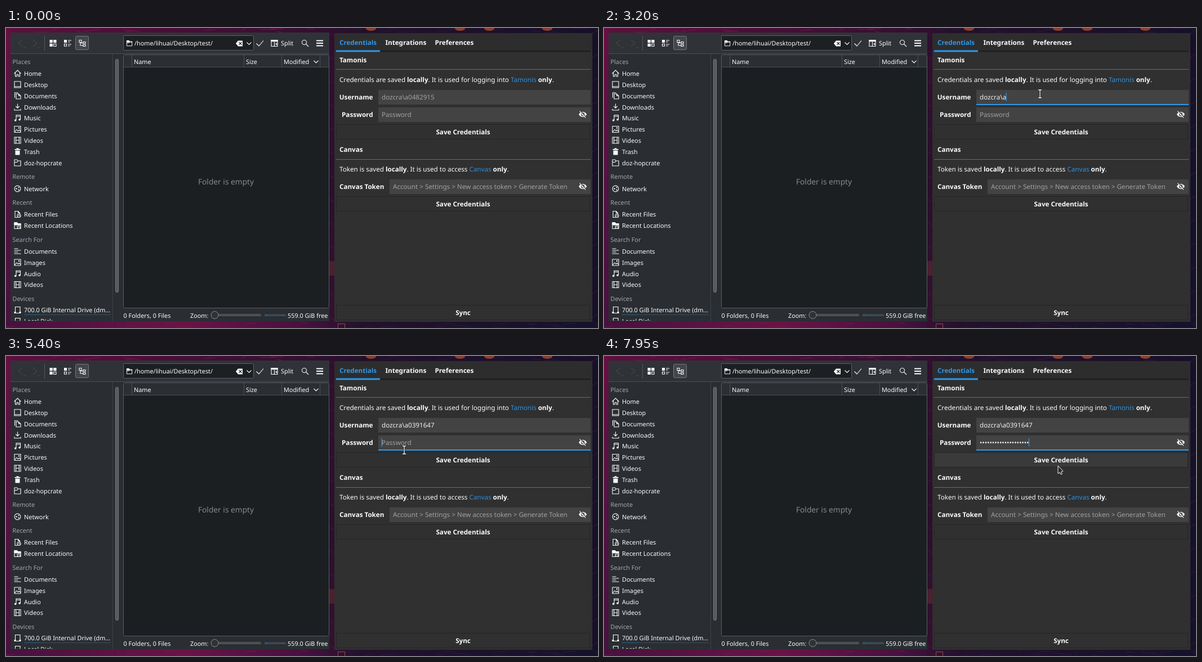
Write an HTML page that moves like this. It is 1051 px wide and 533 px high and loops after 8000 ms.

```html
<!DOCTYPE html>
<html lang="en">
<head>
<meta charset="utf-8">
<title>File sync setup</title>
<style>
  html, body { margin: 0; width: 100%; height: 100%; overflow: hidden; background: #1d1029; }
  svg { display: block; }
  text { font-family: "Noto Sans", "Open Sans", sans-serif; text-rendering: geometricPrecision; white-space: pre; }
  .b { font-weight: 700; }
  .link { fill: #2d8fdd; }
  .icon { fill: none; stroke: #fcfcfc; stroke-width: 1.1; }
  .icon .f { fill: #fcfcfc; stroke: none; }
</style>
</head>
<body>
<svg id="stage" width="1051" height="533" viewBox="0 0 1051 533"></svg>
<script>
const SMALL = 10.86, BIG = 11.63;
const WHITE = '#fcfcfc', DIM = '#a3a6a9', HINT = '#a2a2a2', BLUE = '#2f98ea';
const SAMPLE = 'dozcra\\a0482915', USER = 'dozcra\\a0391647';

const rect = (x, y, w, h, fill, more = '') =>
  `<rect x="${x}" y="${y}" width="${w}" height="${h}" fill="${fill}" ${more}/>`;
const line = (d, stroke, width = 1) =>
  `<path d="${d}" fill="none" stroke="${stroke}" stroke-width="${width}"/>`;
// text is placed by the middle of its capitals
const text = (x, mid, s, size = SMALL, fill = WHITE, more = '') =>
  `<text x="${x}" y="${mid + size * 0.36}" font-size="${size}" fill="${fill}" ${more}>${s}</text>`;
const bold = (x, mid, s, fill = WHITE, more = '') => text(x, mid, s, BIG, fill, 'class="b" ' + more);
const icon = (x, y, body) => `<g class="icon" transform="translate(${x} ${y})">${body}</g>`;
const p = d => `<path d="${d}"/>`;
const solid = d => `<path class="f" d="${d}"/>`;
const dot = (x, y, r) => `<circle class="f" cx="${x}" cy="${y}" r="${r}"/>`;

const folder = p('M.5 11.5V.5H5L6.5 2.5H11.5V11.5ZM.5 5H5L6.8 2.8');
const clock = '<circle cx="8.5" cy="8.5" r="3" fill="#2a2e32"/>' + p('M8.5 6.8V8.7H10');
const icons = {
  home: p('M0 6.5L6 .6 12 6.5M2 5V11.5H4.6V8H7.4V11.5H10V5'),
  desktop: p('M.5 .5H11.5V11.5H.5ZM.5 9.5H11.5'),
  docs: p('M3.5 2.5H8L11.5 6V11.5H3.5ZM8 2.5V6H11.5M1 9.5V.5H7'),
  down: p('M6 0V7.5M2.8 4.5L6 7.7 9.2 4.5M.5 9V11.5H11.5V9'),
  music: p('M3.5 9.5V.8H11V8.5M3.5 3H11') + dot(2.2, 10, 1.8) + dot(9.6, 8.8, 1.8),
  pics: p('M.5 .5H11.5V11.5H.5ZM1 10.5L4.5 6.5 6.8 9 8.8 7 11.5 9.8') + dot(8.5, 3.5, 1.2),
  video: p('M.5 .5H11.5V11.5H.5ZM3.2 0V12M8.8 0V12M3.2 6H8.8'),
  trash: solid('M4 0H8V1.5H11V3.2H1V1.5H4ZM2 4.2H10V12H2Z'),
  folder,
  net: '<circle cx="6" cy="6" r="5.4"/>' + dot(4, 6, 1.2) + dot(8, 3.8, 1.1) + dot(8, 8.2, 1.1),
  recent: p('M1.5 .5H7L10 3.5V6M7 .5V3.5H10M1.5 0V11.5H6') + clock,
  places: folder + solid('M0 0H5L6.5 2.5H12V5H0Z') + clock,
  lines: p('M0 1.5H7M0 4.5H12M0 7.5H7M0 10.5H12'),
  drive: p('M2 .5H10.5V11.5H2Z') + solid('M0 9H3V12H0ZM9 9H12V12H9Z')
};

const gradient = (id, stops, more = '') => `<linearGradient id="${id}" ${more}>` +
  stops.map(([at, c]) => `<stop offset="${at}" stop-color="${c}"/>`).join('') + '</linearGradient>';

function wallpaper() {
  let seed = 7;
  const rnd = () => (seed = seed * 16807 % 2147483647) / 2147483647;
  const down = 'x2="0" y2="1"';
  let s = '<defs>' +
    gradient('top', [[0, '#5f0f3d'], [0.2, '#500d3a'], [0.5, '#350f30'], [0.6, '#22102a'], [1, '#171029']]) +
    gradient('bottom', [[0, '#47113f'], [0.3, '#6c1248'], [0.5, '#481040'], [0.6, '#22112d'], [1, '#16122b']]) +
    gradient('left', [[0, '#680f42'], [0.5, '#561143'], [1, '#47113f']], down) +
    gradient('gap', [[0, '#300f2e'], [0.6, '#2a102c'], [1, '#35112f']], down) +
    '<clipPath id="side"><rect x="8" y="46" width="181" height="474"/></clipPath></defs>' +
    rect(0, 0, 1051, 266, 'url(#top)') + rect(0, 266, 1051, 267, 'url(#bottom)') +
    rect(0, 0, 8, 533, 'url(#left)') + rect(574, 0, 9, 533, 'url(#gap)') + rect(1041, 9, 10, 513, '#171029');
  for (let i = 0; i < 60; i++) {
    const x = rnd() * 1051, y = i % 2 ? rnd() * 9 : 522 + rnd() * 11;
    s += line(`M${x} ${y}l${8 + rnd() * 22} ${rnd() * 8 - 4}`, x < 580 ? '#7a1a4c' : '#2c1c40', 0.8);
  }
  for (let y = 10; y < 520; y += 42) s += line(`M1041 ${y}l10 -6M0 ${y}l8 5M574 ${y}l9 4`, '#4a1b45', 0.8);
  for (const x of [648, 806, 858, 961])
    s += `<ellipse cx="${x}" cy="1" rx="9" ry="4" fill="#8a3f2e"/>`;
  return s + rect(574, 414, 9, 26, '#4c2030') + line('M589.5 533V525.5H601.5V533', '#a04a30');
}

function sidebar() {
  const rows = [
    [81, 'home', 'Home'], [101, 'desktop', 'Desktop'], [121, 'docs', 'Documents'], [141, 'down', 'Downloads'],
    [160.5, 'music', 'Music'], [180.5, 'pics', 'Pictures'], [200, 'video', 'Videos'], [220, 'trash', 'Trash'],
    [240, 'folder', 'doz-hopcrate'], [286, 'net', 'Network'], [331.5, 'recent', 'Recent Files'],
    [351.5, 'places', 'Recent Locations'], [397, 'lines', 'Documents'], [417, 'pics', 'Images'],
    [437, 'music', 'Audio'], [456.5, 'video', 'Videos'], [501.5, 'drive', '700.0 GiB Internal Drive (dm...'],
    [521.5, 'drive', 'Local Disk']
  ];
  const heads = [[60, 'Places'], [264.5, 'Remote'], [310.5, 'Recent'], [376, 'Search For'], [481.5, 'Devices']];
  return '<g clip-path="url(#side)">' +
    rows.map(([y, k, s]) => icon(14.5, y - 6.5, icons[k]) + text(32, y, s)).join('') +
    heads.map(([y, s]) => text(11.5, y, s, SMALL, DIM)).join('') +
    rect(32, 508.5, 154, 1.6, '#35434f') + rect(32, 508.5, 28, 1.6, '#274f6c') + '</g>' +
    line('M189.5 46V521', '#3e4246') +
    rect(194.5, 55.5, 5, 414, '#54585b', 'rx="2.5" stroke="#7b7e81"');
}

function toolbar() {
  const tree = p('M.5 .5H4.5V4.5H.5ZM7.5 3.5H11.5V6.5H7.5ZM7.5 8.5H11.5V11.5H7.5ZM2.5 4.5V10H7.5M2.5 5.5H7.5');
  return rect(8, 8, 566, 38, '#2f3338') + line('M8 45.5H574', '#4b4f53') +
    line('M29 21L22 27 29 33M48 21L55 27 48 33M31 34l2 2 2-2M57 34l2 2 2-2', '#4c5054') +
    line('M68.5 14V40', '#55595d') +
    icon(77.5, 21, solid('M0 0H5.3V5.3H0ZM6.7 0H12V5.3H6.7ZM0 6.7H5.3V12H0Z') + p('M7.2 7.2H11.5V11.5H7.2Z')) +
    icon(103, 21, solid('M0 0H5V5H0Z') + p('M.5 7.2H4.5V11.2H.5ZM7 1H13M7 3.8H10.5M7 8H13M7 10.8H10.5')) +
    rect(123.5, 14.5, 23, 24, '#43474b', 'rx="2" stroke="#74787b"') + icon(129.5, 21, tree) +
    rect(208.5, 13.5, 231, 26, '#1c2023', 'rx="2" stroke="#5d6164"') +
    icon(214, 22, '<g transform="scale(.85)">' + folder + solid('M0 0H5L6.5 2.5H12V4H0Z') + '</g>') +
    text(228, 27.5, '/home/lihuai/Desktop/test/') +
    icon(408, 22.5, solid('M0 5L4 0H12V10H4Z') + '<path d="M5.5 2.5l5 5m0-5l-5 5" stroke="#1c2023"/>') +
    line('M427.5 25.5L431.5 29.5 435.5 25.5M444.5 27.5L449 32 457 22.5', WHITE, 1.1) +
    icon(470.5, 21, p('M.5 .5H11.5V11.5H.5ZM6 3.5V12M8 7.5H11M9.5 5.5V9.5') + solid('M0 0H12V3.2H0Z')) +
    text(488, 27.5, 'Split') +
    icon(525, 21, '<circle cx="4.5" cy="4.5" r="4"/>' + p('M7.5 7.5L12 12')) +
    line('M551 22.5H563M551 27H563M551 31.5H563', WHITE, 1.8);
}

function fileView() {
  return rect(208, 47, 366, 450, '#1b1f22', 'rx="2"') + rect(209, 48, 364, 22, '#2b2f34') +
    line('M209 69.5H573M223.5 48V70M422.5 48V70M489.5 48V70M557.5 48V70', '#4c5054') +
    text(227, 60, 'Name') + text(426, 60, 'Size') + text(493, 60, 'Modified') +
    line('M546.5 58L550.5 62 554.5 58', WHITE, 1.1) +
    text(390.5, 273, 'Folder is empty', 13.75, '#85898b', 'text-anchor="middle"') +
    rect(208.5, 47.5, 365, 450, 'none', 'id="viewEdge" rx="2"') +
    text(208.5, 511, '0 Folders, 0 Files') + text(327, 511, 'Zoom:') +
    rect(364.5, 508.5, 88, 3, '#45494d', 'rx="1.5" stroke="#5b5f63"') +
    '<circle cx="370.5" cy="510" r="6.5" fill="#2f3337" stroke="#8a8d90"/>' +
    rect(459, 508.5, 38, 3.5, '#3c4b57', 'rx="1.5"') + rect(459, 508.5, 5, 3.5, '#27587c', 'rx="1.5"') +
    text(500, 511, '559.0 GiB free');
}

const field = (x, y) => rect(x, y, 1038 - x, 26, '#434343');
const button = (y, s, id = '') => rect(586.5, y + 0.5, 450, 26, '#303030', `stroke="#262626" id="${id}"`) +
  bold(811.5, y + 13.5, s, WHITE, 'text-anchor="middle"');
const eye = y => icon(1017, y - 6, solid('M0 6C3 0 11 0 14 6C11 12 3 12 0 6Z') +
  '<circle cx="7" cy="6" r="3.2" fill="#434343" stroke="none"/>' + dot(7, 6, 1.8) +
  '<path d="M2.3 -.4L13 11" stroke="#434343" stroke-width="1.4"/>' + p('M1.4 .2L12 11.8'));
const note = (y, a, b, c, name) => text(592, y, `${a}<tspan class="b">locally</tspan>${b}` +
  `<tspan class="link">${name}</tspan> <tspan class="b">only</tspan>${c}`, BIG);

function settings() {
  return rect(583, 9, 458, 513, '#303030') + rect(583, 9, 458, 31, '#2d2d2d') +
    rect(586, 40, 452, 2.5, '#1f1f1f') + rect(586, 39.5, 78, 3, BLUE) +
    bold(592, 26, 'Credentials', BLUE) + bold(673.5, 26, 'Integrations') + bold(761.5, 26, 'Preferences') +
    bold(592, 57, 'Tamonis') + line('M586 73.5H1038M586 233.5H1038', '#6b6b6b') +
    note(91.5, 'Credentials are saved ', '. It is used for logging into ', '.', 'Tamonis') +
    bold(651.5, 123, 'Username', WHITE, 'text-anchor="end"') + field(661, 110) +
    bold(651.5, 154, 'Password', WHITE, 'text-anchor="end"') + field(661, 141) + eye(153.5) +
    button(171, 'Save Credentials', 'save') + bold(592, 216, 'Canvas') +
    note(251, 'Token is saved ', '. It is used to access ', '.', 'Canvas') +
    bold(592, 282, 'Canvas Token') + field(681, 269) + eye(281.5) +
    text(687, 282, 'Account &gt; Settings &gt; New access token &gt; Generate Token', BIG, HINT) +
    button(299, 'Save Credentials') + button(492, 'Sync') +
    text(667, 123, '', BIG, WHITE, 'id="user"') + text(667, 154, '', BIG, WHITE, 'id="pass"') +
    rect(661, 135, 377, 2, BLUE, 'id="focus"') + rect(0, 115, 1.2, 15, BLUE, 'id="caret"');
}

const pointers = `<path id="arrow" d="M0 0V14L3.2 11.6 5 15.5 7.4 14.4 5.7 10.7 9 9.6Z" fill="#24272a" stroke="#f4f4f4" stroke-linejoin="round"/>
  <g id="beam" fill="none"><path d="M-3.5 -7H3.5M-3.5 7H3.5M0 -7V7" stroke="#222" stroke-width="3"/>
  <path d="M-3 -7H3M-3 7H3M0 -7V7" stroke="#f4f4f4" stroke-width="1.3"/></g>`;

document.getElementById('stage').innerHTML = wallpaper() + rect(8, 8, 566, 513, '#2a2e32') +
  toolbar() + sidebar() + fileView() + settings() + pointers;

const ui = {};
for (const id of ['viewEdge', 'save', 'user', 'pass', 'focus', 'caret', 'arrow', 'beam'])
  ui[id] = document.getElementById(id);
const show = (el, on) => el.setAttribute('visibility', on ? 'visible' : 'hidden');

// time, x, y
const path = [
  [100, 312, 2], [300, 430, 12], [500, 600, 40], [700, 740, 100], [900, 774, 117], [4600, 774, 117],
  [4700, 814, 74], [4900, 760, 110], [5200, 705, 158], [5400, 707, 167], [5500, 640, 215], [5600, 565, 262],
  [5700, 565, 262], [5800, 556, 266], [6100, 572, 271], [7250, 572, 271], [7400, 690, 154],
  [7650, 690, 154], [7800, 760, 178], [7950, 806, 195]
];
const keyTimes = [1200, 1400, 1600, 1800, 1900, 2100, 2700, 3200, 3400, 3600, 3700, 3800, 3900, 4100, 4200];
const within = (t, a, b) => t >= a && t < b;

function pointerAt(t) {
  const i = path.findIndex(k => k[0] > t);
  if (i < 0) return path[path.length - 1].slice(1);
  const [t0, x0, y0] = path[i - 1], [t1, x1, y1] = path[i], f = (t - t0) / (t1 - t0);
  return [x0 + (x1 - x0) * f, y0 + (y1 - y0) * f];
}

function setField(el, value, hint) {
  const s = value || hint;
  if (el.textContent !== s) el.textContent = s;
  el.setAttribute('fill', value ? '#f0f0f0' : HINT);
}

function draw(time) {
  const step = time < 7200 ? 100 : 50, t = Math.floor(time / step) * step;
  const typed = USER.slice(0, keyTimes.filter(k => k <= t).length);
  const dots = '•'.repeat(t < 7550 ? 0 : Math.min(20, Math.floor((t - 7500) / 50) * 7));
  setField(ui.user, typed, SAMPLE);
  setField(ui.pass, dots, 'Password');

  const onUser = within(t, 900, 5300), onPass = within(t, 5300, 5800) || t >= 7450;
  show(ui.focus, onUser || onPass);
  ui.focus.setAttribute('y', onUser ? 135 : 166);

  const value = onUser ? typed : dots, el = onUser ? ui.user : ui.pass;
  const blink = within(t, 900, 1000) || within(t, 2600, 2700) || within(t, 2800, 2900) || within(t, 5600, 5800);
  show(ui.caret, (onUser || onPass) && !blink);
  ui.caret.setAttribute('x', 666.5 + (value ? el.getComputedTextLength() : 0));
  ui.caret.setAttribute('y', onUser ? 115 : 146);

  const visible = t >= 100, [x, y] = visible ? pointerAt(t) : [-50, -50];
  const inField = x > 661 && x < 1038 && y > 109 && y < 168;
  for (const el of [ui.arrow, ui.beam]) el.setAttribute('transform', `translate(${x} ${y})`);
  show(ui.arrow, visible && !inField);
  show(ui.beam, visible && inField);

  const inView = x > 208 && x < 574 && y > 47 && y < 497;
  ui.viewEdge.setAttribute('stroke', inView ? '#356482' : '#5a5e61');
  ui.save.setAttribute('fill', x > 586 && y > 171 && y < 198 ? '#3a3a3a' : '#303030');
}

const start = performance.now();
function tick() {
  draw((performance.now() - start) % 8000);
  requestAnimationFrame(tick);
}
tick();
</script>
</body>
</html>
```
